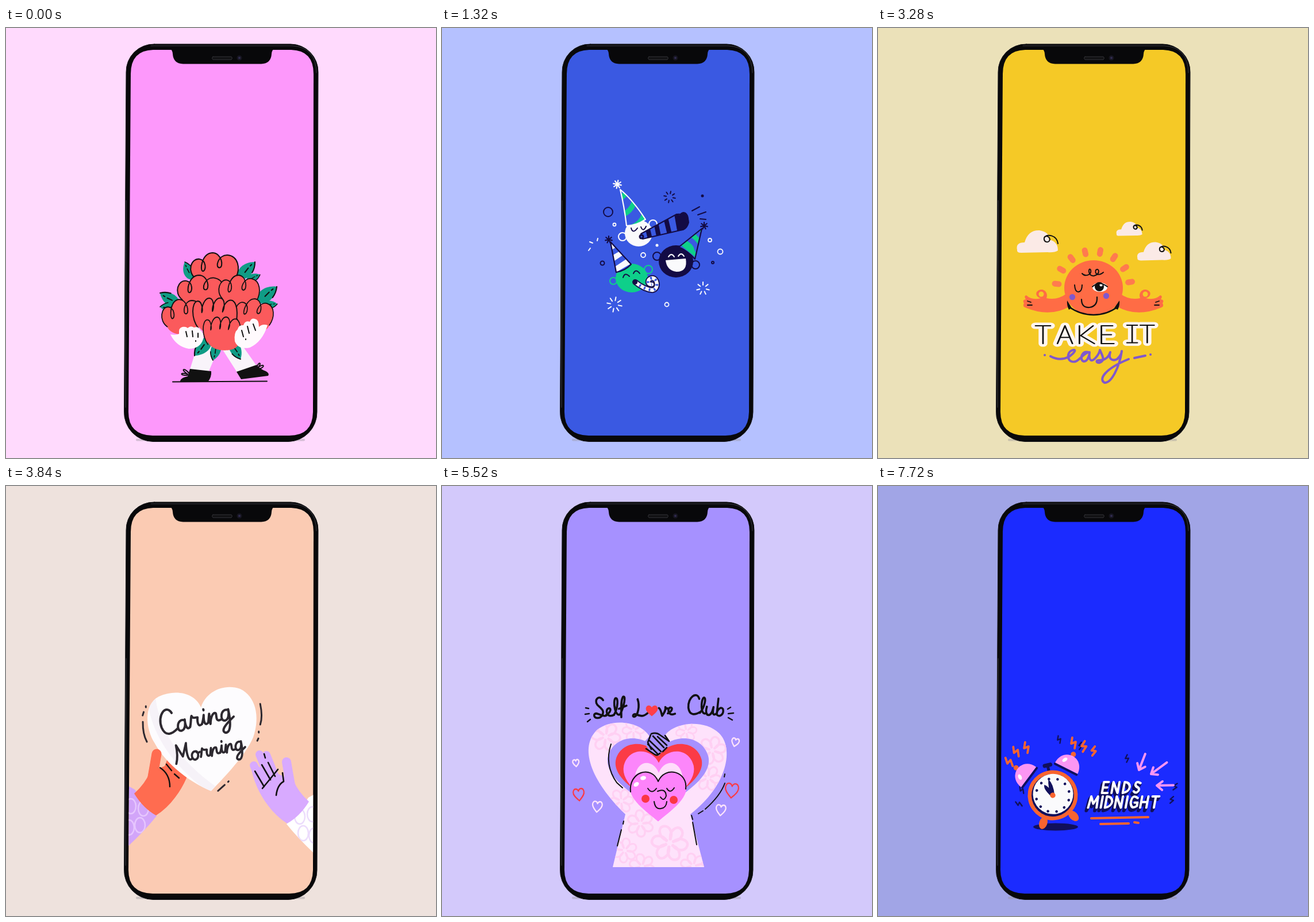
An HTML page with a canvas for the animation above (7.8 s loop, 748x748 px).

```html
<!DOCTYPE html>
<html lang="en">
<head>
<meta charset="utf-8">
<title>Phone stickers</title>
<style>
html, body { margin: 0; width: 100%; height: 100%; overflow: hidden; }
canvas { display: block; width: 100vw; height: 100vh; }
</style>
</head>
<body>
<canvas id="stage" width="748" height="748"></canvas>
<script>
const c = document.getElementById('stage').getContext('2d');
const TAU = Math.PI * 2, BLACK = '#111';
const wave = x => Math.sin(TAU * x);
const clamp = x => Math.max(0, Math.min(1, x));
const mix = (a, b, k) => a + (b - a) * k;

const fill = (d, col) => { c.fillStyle = col; c.fill(new Path2D(d)); };
const line = (d, col = BLACK, w = 2) => { c.strokeStyle = col; c.lineWidth = w; c.stroke(new Path2D(d)); };
const both = (d, col, edge, w) => { fill(d, col); line(d, edge, w); };
function at(x, y, rot, sx, draw, sy = sx) {
  c.save(); c.translate(x, y); c.rotate(rot); c.scale(sx, sy); draw(); c.restore();
}
// turn and shift a drawing around a pivot
function sway(px, py, rot, dx, dy, draw) {
  c.save(); c.translate(px + dx, py + dy); c.rotate(rot); c.translate(-px, -py); draw(); c.restore();
}
function oval(x, y, rx, ry, col, rot = 0) {
  c.fillStyle = col; c.beginPath(); c.ellipse(x, y, rx, ry, rot, 0, TAU); c.fill();
}
const dot = (x, y, r, col) => oval(x, y, r, r, col);
function ring(x, y, r, col, w = 2, ry = r) {
  c.strokeStyle = col; c.lineWidth = w; c.beginPath(); c.ellipse(x, y, r, ry, 0, 0, TAU); c.stroke();
}
function burst(x, y, r1, r2, count, col, w = 2) {
  c.strokeStyle = col; c.lineWidth = w; c.beginPath();
  for (let i = 0; i < count; i++) {
    const a = TAU * (i + .25) / count;
    c.moveTo(x + r1 * Math.cos(a), y + r1 * Math.sin(a));
    c.lineTo(x + r2 * Math.cos(a), y + r2 * Math.sin(a));
  }
  c.stroke();
}

// lettering: [path, advance]
const SCRIPT = {
  C: ['M14 -21C10 -32 -2 -22 0 -8C2 3 10 1 16 -3', 16],
  M: ['M0 0C4 -8 5 -18 5 -25L11 -8L19 -25C17 -14 16 1 22 -2', 22],
  S: ['M12 -22C8 -30 0 -24 4 -17C8 -12 13 -9 9 -3C5 2 -3 0 -1 -5C3 -9 8 0 14 -2', 14],
  L: ['M3 -24C6 -14 2 -2 -2 0C-6 1 -5 -5 0 -3C6 0 10 1 16 -4', 16],
  a: ['M10 -10C2 -15 -2 0 4 0C9 0 10 -8 10 -11C9 -2 11 1 14 -2', 14],
  r: ['M0 -2C2 -6 3 -12 4 -13C5 -9 8 -11 10 -10C8 -4 9 1 13 -2', 13],
  i: ['M0 -2C2 -5 3 -8 4 -11C2 -3 3 1 7 -2M5 -17V-16', 7],
  n: ['M0 -2L3 -11L2 0C4 -8 8 -12 10 -10C11 -8 7 0 14 -2', 14],
  g: ['M10 -10C2 -15 -2 0 4 0C8 0 10 -6 10 -11C10 0 8 14 2 13C-4 10 4 4 14 -2', 14],
  o: ['M8 -11C0 -13 -1 0 5 0C11 -1 11 -10 8 -11C9 -8 11 -8 13 -9', 13],
  e: ['M0 -3C6 -5 8 -11 4 -11C-1 -10 0 2 10 -2', 10],
  l: ['M0 -2C6 -10 8 -24 4 -23C0 -20 1 2 8 -2', 8],
  f: ['M0 -2C6 -12 10 -25 6 -24C2 -20 2 -6 1 2M-1 -9L9 -12', 9],
  v: ['M0 -11C3 -9 3 -3 4 0C7 -4 10 -8 9 -12C10 -10 11 -9 12 -10', 12],
  u: ['M1 -11C-1 -2 2 1 5 0C9 -2 9 -7 10 -11C9 -2 10 1 14 -2', 14],
  b: ['M2 -23L1 -1C6 3 11 -3 9 -9C6 -13 2 -8 1 -4', 13]
};
const BLOCK = {
  T: ['M0 0H12M6 0V20', 12], A: ['M0 20L6 0L12 20M2 13H10', 12], K: ['M0 0V20M11 0L1 11L12 20', 12],
  E: ['M9 0H0V20H10M0 10H8', 9], I: ['M0 0H9M4.5 0V20M0 20H9', 9], i: ['M1 0V20', 2],
  N: ['M0 20V0L11 20V0', 12], D: ['M0 0V20Q11 18 11 9Q9 0 0 0', 11], G: ['M11 3Q0 -5 0 11Q3 24 12 17V11H7', 12],
  S: ['M10 2Q1 -3 1 5Q3 9 7 10Q12 15 6 19Q3 20 0 17', 10], M: ['M0 20L2 0L8 13L14 0L15 20', 15], H: ['M0 0V20M11 0V20M0 10H11', 12]
};
function write(font, word, x, y, size, col, w, { rot = 0, gap = 0, slant = 0, wide = 1 } = {}) {
  at(x, y, rot, size * wide, () => {
    c.transform(1, 0, slant, 1, 0, 0);
    for (const ch of word) {
      line(font[ch][0], col, w / size);
      c.translate(font[ch][1] + gap, 0);
    }
  }, size);
}

const HEART = 'M0 -.3C-.1 -.55 -.42 -.58 -.49 -.25C-.54 .05 -.2 .3 0 .5C.2 .3 .54 .05 .49 -.25C.42 -.58 .1 -.55 0 -.3Z';
const heart = (x, y, w, h, col) => at(x, y, 0, w, () => fill(HEART, col), h);
const heartLine = (x, y, s, col, rot) => at(x, y, rot, s, () => line(HEART, col, 2.2 / s), s * 1.1);

// ---- bouquet ----
const RED = '#fb5a5c';
const BLOOM3 = 'M-30 16C-46 4 -38 -20 -24 -18C-12 -16 -12 2 -18 3C-24 2 -20 -28 -2 -29C14 -29 18 -4 10 -3C2 -3 8 -26 24 -25C42 -23 46 -2 38 14';
const BLOOM4 = 'M-30 22C-44 4 -42 -22 -32 -24C-23 -25 -22 -8 -24 -5C-25 -14 -19 -30 -10 -29C-2 -28 -2 -12 -5 -7C-6 -16 1 -31 10 -29C18 -27 17 -12 13 -6C14 -18 22 -28 31 -25C42 -18 40 8 34 20';
function bloom(x, y, w, h, rot, top = BLOOM3) {
  at(x, y, rot, w / 80, () => {
    fill(top + 'C34 38 -24 38 -30 16Z', RED);
    line(top, BLACK, 2);
  }, h / 58);
}
function leaf(x, y, tx, ty) {
  at(x, y, Math.atan2(ty - y, tx - x), Math.hypot(tx - x, ty - y) / 40, () => {
    fill('M0 0C8 -16 28 -13 40 0C28 12 10 14 0 0Z', '#109c86');
    line('M16 0L25 -1M30 -1H33M24 9Q33 7 40 0');
  });
}
function foot(dy, rot, px, py, d, laces) {
  sway(px, py, rot, 0, dy, () => { fill(d, BLACK); line(laces); });
}
function bouquet(n) {
  const s = wave(n / 12), lift = (1 - Math.cos(TAU * n / 12)) / 2, dx = 11 * s, hop = -3 * Math.abs(s);
  line('M290 615.5L454 614.5');
  fill(`M${333 + dx} 552H${372 + dx}L352 ${599 - 6 * lift}L319 ${597 - 6 * lift}Z`, '#f9f4fa');
  fill(`M${372 + dx} 552L${408 + dx} 548L437 ${589 + 5 * lift}L402 ${599 + 5 * lift}Z`, '#f9f4fa');
  foot(-5 * lift, .13 * lift, 330, 606, 'M320 593L357 597Q358 607 351 616H303Q302 609 316 606Z',
    'M318 600C308 589 304 595 316 602C302 598 302 605 316 604');
  foot(6 * lift, .14 * lift, 430, 604, 'M401 598L436 586Q441 593 452 597Q459 601 456 605L409 611Z',
    'M436 591C440 578 446 583 438 591C449 582 452 590 440 593');
  sway(365, 555, .09 * s, dx * .5, hop, () => {
    leaf(324, 438, 311, 407); leaf(404, 437, 433, 407); leaf(418, 440, 442, 429);
    leaf(437, 478, 471, 450); leaf(445, 483, 472, 480); leaf(303, 482, 268, 461); leaf(302, 486, 268, 485);
    leaf(356, 538, 328, 570); leaf(368, 545, 360, 578); leaf(390, 543, 408, 576);
    bloom(361, 420, 82, 58, 0); bloom(337, 458, 80, 56, .03); bloom(404, 458, 70, 56, .1);
    bloom(305, 501, 70, 58, -.1); bloom(430, 498, 66, 54, .2);
    bloom(364, 500, 78, 60, 0, BLOOM4); bloom(376, 530, 66, 54, 0, BLOOM4);
    fill('M286 533Q296 535 301 532Q300 521 307 520Q313 519 316 522Q321 517 327 521Q335 518 338 526Q345 530 343 541Q338 558 318 558Q296 554 286 533Z', '#fffafd');
    line('M313 528L315 537M324 527L325 537M334 531V538M330 544V545', BLACK, 2);
    fill('M455 517Q446 514 440 520Q440 507 433 506Q427 504 424 511Q416 508 413 517Q405 516 403 524Q396 530 398 545Q404 560 424 556Q446 546 455 517Z', '#fffafd');
    line('M430 515L434 526M420 519L423 531M410 526L413 537M417 541V542');
  });
}

// ---- party ----
const NAVY = '#130b45', MINT = '#0ecf8a', BLUE = '#3a59e2', SNOW = '#fafafc';
function hat(d, base, stripe, edge, bands) {
  fill(d, base);
  c.save(); c.clip(new Path2D(d)); line(bands, stripe, 9); c.restore();
  line(d, edge, 2.2);
}
function party(n) {
  const s = wave(n / 12), s2 = wave(n / 6), pop = 1 + .25 * s2;
  sway(342, 378, .06 * s, 0, 2 * s2, () => {
    burst(305, 272, 1, 7, 8, SNOW, 2.2);
    ring(314, 363, 7, SNOW); ring(367, 341, 7, SNOW);
    oval(342, 357, 24, 23, SNOW);
    hat('M310 281Q332 299 354 333Q338 344 321 344Q317 310 310 281Z', BLUE, MINT, SNOW, 'M307 300L324 284M312 326Q328 320 334 304M320 349Q345 345 352 324');
    line('M329 348Q332 359 340 348M346 346Q350 356 355 345', NAVY);
    at(346, 363, 0, 1 + .08 * s, () => {
      const horn = 'M0 -5L62 -39Q82 -41 83 -25Q80 -12 68 -11L3 4Z';
      fill(horn, BLUE);
      c.save(); c.clip(new Path2D(horn)); line('M11 -17L17 8M26 -25L32 4M43 -33L51 0M61 -45L69 0', NAVY, 8); c.restore();
      line(horn, NAVY, 2); oval(73, -27, 10, 16, NAVY, .15); dot(1, 0, 4.5, NAVY); dot(1, 0, 1.5, BLUE);
    });
  });
  sway(330, 455, -.06 * s, 0, -2 * s2, () => {
    burst(290, 368, 1, 6, 7, NAVY, 2.2);
    ring(298, 440, 6, MINT); ring(359, 420, 7, MINT);
    oval(330, 435, 28, 25, MINT);
    hat('M293 372L329 411Q319 422 303 425Z', SNOW, BLUE, NAVY, 'M290 394L309 383M296 413L320 397M303 430L334 412');
    line('M315 434Q318 424 326 432M333 427Q337 418 344 427', NAVY);
    const curl = 'M336 442C346 450 355 455 366 456C378 454 375 434 365 435C356 437 357 447 365 446';
    line(curl, NAVY, 10); line(curl, SNOW, 6.5);
    c.setLineDash([3, 6]); c.lineCap = 'butt'; line(curl, BLUE, 5); c.setLineDash([]); c.lineCap = 'round';
    dot(336, 442, 4, NAVY);
  });
  sway(407, 430, .06 * s2, 0, 2 * s, () => {
    burst(456, 344, 1, 6, 7, NAVY, 2.2);
    ring(374, 397, 7, NAVY); ring(441, 412, 7, NAVY);
    oval(407, 406, 30, 28, NAVY);
    hat('M452 349L440 402Q428 388 412 381Z', MINT, BLUE, NAVY, 'M424 364Q442 373 444 386M440 351L455 367M411 380L440 404');
    line('M394 398Q399 390 404 398M411 397Q416 389 421 397', SNOW);
    fill('M389 404L424 401Q428 424 408 424Q391 422 389 404Z', SNOW);
  });
  burst(396, 294, 6 * pop, 10 * pop, 8, NAVY);
  burst(300, 481, 7 * pop, 13 * pop, 8, SNOW);
  burst(454, 453, 6 * pop, 11 * pop, 7, SNOW);
  line('M435 318L448 311M445 325L459 320M449 332L459 333', NAVY);
  line('M271 366L270 370M262 374L257 372M258 383L255 387', SNOW);
  [[300, 342, 2.5], [350, 395, 4], [391, 481, 3.5], [466, 369, 3], [484, 389, 4.5]].forEach(([x, y, r], i) =>
    ring(x, y + 2 * s * (i % 2 ? 1 : -1), r, SNOW, 1.8));
  dot(374, 378, 2.5, SNOW);
  ring(289, 320 - 2 * s, 8, NAVY); dot(453, 292, 2.5, NAVY); ring(471, 408, 2, NAVY); ring(279, 409, 3.5, NAVY);
}

// ---- sun ----
const SUN = '#ff6c45', VIOLET = '#8058cc';
function cloud(x, y, s) {
  at(x, y, 0, s, () => {
    fill('M-35 15Q-38 2 -22 2Q-16 -20 4 -19Q22 -16 20 -3Q36 0 36 16Q30 20 18 19L-28 20Q-36 20 -35 15Z', '#fbeae6');
    line('M12 -6C11 2 20 4 22 -3C21 -9 14 -11 12 -6C16 -14 34 -11 36 4', BLACK, 2 / s);
  });
}
function arm(bend) {
  sway(330, 475, bend, 0, 0, () => {
    fill('M328 462Q312 474 293 470C297 460 288 452 280 456C272 460 275 468 283 470Q268 474 258 465Q253 466 257 472Q250 473 254 479Q250 484 258 487Q300 504 334 484Z', SUN);
    dot(284, 463, 4.5, '#f5c926');
    line('M260 475L266 477M260 482L268 482', BLACK, 1.8);
  });
}
function sun(n) {
  const s = wave((n - 8) / 12);
  cloud(277 - 26 * s, 371, 1); cloud(480 + 24 * s, 388, .82); cloud(437 + 14 * s, 349, .63);
  for (let i = 0; i < 8; i++)
    at(375, 453, (187 + i * 23.3) * Math.PI / 180, 1, () => line(`M${61 + 3 * s} 0h7`, '#ff7b4e', 10));
  arm(.08 * s);
  c.save(); c.translate(749, 0); c.scale(-1, 1); arm(.08 * s); c.restore();
  oval(375, 452, 51, 48, SUN);
  fill('M329 474Q328 482 332 490L337 487ZM420 474Q421 482 417 490L411 487Z', BLACK);
  line('M332 485Q352 499 375 499Q398 499 417 485', BLACK, 2.6);
  line('M342 447Q343 460 349 459Q355 458 355 447');
  oval(386, 451, 13, 8, SNOW); dot(385, 450, 8, BLACK); dot(388, 447, 2.5, SNOW);
  line('M373 450Q385 439 399 450');
  dot(338, 468, 5.2, VIOLET); dot(397, 466, 5.2, VIOLET);
  line('M354 472Q354 487 368 486Q382 484 381 468', BLACK, 2.2);
  line('M355 427C360 433 372 430 370 421C366 414 364 433 376 431C388 428 384 416 379 421C376 428 384 432 392 425');
  for (const [col, w] of [['#fff6f0', 11], [BLACK, 2]]) {
    write(BLOCK, 'TAKE', 274, 518, 1.55, col, w, { gap: 5.6, wide: 1.4 });
    write(BLOCK, 'IT', 433, 517, 1.53, col, w, { gap: 2.5, wide: 1.32 });
  }
  line('M300 571Q316 580 332 572C346 562 344 558 337 561C326 566 330 584 344 580C352 576 356 568 366 564C354 560 350 578 358 580C366 580 368 566 368 564C366 580 372 582 380 572Q385 566 386 560C390 570 396 578 386 582C380 583 378 578 384 578C398 578 402 570 404 564C400 576 408 580 416 576Q424 568 424 562C420 590 406 618 394 617C384 612 392 594 436 576M446 574L465 570M474 568h.1M290 569h.1', VIOLET, 4);
}

// ---- passing the heart ----
const THUMB = 'M488 480Q491 498 495 520', INKY = '#2d2930';
function hand(skin, sleeve, pattern) {
  const cuff = 'M488 588Q506 572 526 542L537 536V640Q508 613 488 588Z';
  fill(cuff, sleeve);
  c.save(); c.clip(new Path2D(cuff));
  for (const [x, y] of [[511, 575], [533, 571], [517, 604], [536, 608]]) ring(x, y, 9, pattern, 2.5, 13);
  c.restore();
  fill('M425 484Q432 525 456 556Q470 575 489 587Q511 575 527 549Q508 532 500 512L452 492Z', skin);
  line('M431 486L448 520M441 467L458 508M453 468L470 510', skin, 14);
  line(THUMB, skin, 16);
}
function pass(n) {
  const q = clamp((n - 14) / 7), shake = n < 12 ? wave((n - 10) / 6) : 0;
  const mirror = draw => { c.save(); c.translate(750, -14); c.scale(-1, 1); draw(); c.restore(); };
  mirror(() => hand('#ff6c50', '#d2a5f9', '#e6c6fe'));
  const catchUp = 10 * clamp((n - 17) / 2) * (1 - q);
  c.save(); c.translate(0, -catchUp);
  hand('#d8aaff', '#fff', '#ecdcfc');
  line('M433 496L449 523M445 485L460 511M449 466L451 473M456 481L468 505M446 526L473 493M470 538Q472 520 483 514L481 499', BLACK, 2.6);
  c.restore();
  sway(343, 440, .035 * shake + .1 * wave(q / 2) - .03 * q, 64 * q, 10 * q - 100 * 4 * q * (1 - q), () => {
    const body = 'M341 385C330 358 296 352 268 364C240 378 244 420 258 444C278 484 320 516 354 531C380 506 416 470 430 440C444 404 436 368 410 355C382 344 350 358 341 385Z';
    fill(body, '#fdfcfe');
    c.save(); c.clip(new Path2D(body)); line('M254 355Q258 455 360 531', '#f6f2f8', 15); c.restore();
    write(SCRIPT, 'Caring', 274, 431, 1.62, INKY, 4, { rot: -.2 });
    write(SCRIPT, 'Morning', 295, 482, 1.27, INKY, 3.8, { rot: -.19 });
    if (n < 12) line('M245 380v2M241 390L239 396M239 407Q238 428 245 442M444 382Q448 404 443 418M440 430v2M439 442L437 446M366 531L378 521M384 516L385 515', INKY, 3);
  });
  mirror(() => {
    line(THUMB, '#ff6c50', 17);
    line('M482 504Q465 515 465 537M471 498L462 509M457 515L449 522', BLACK, 2.4);
  });
  if (q === 1) line(THUMB, '#d8aaff', 16);
}

// ---- self love ----
function petals(x, y, r) {
  for (let i = 0; i < 6; i++) at(x, y, i * TAU / 6 + x, r / 20, () => line('M4 -2C9 -9 21 -7 20 0C19 7 9 8 4 2', '#ffd0f3', 3));
}
function club(n) {
  const s = wave(n / 12), s2 = wave(n / 6);
  write(SCRIPT, 'Self', 267, 404, 1.36, BLACK, 3.6, { rot: -.1 });
  write(SCRIPT, 'L', 338, 401, 1.25, BLACK, 3.6, { rot: -.05 });
  heart(365, 391, 21 * (1 + .1 * s2), 19 * (1 + .1 * s2), '#ff3f48');
  write(SCRIPT, 've', 378, 400, 1.25, BLACK, 3.6, { rot: -.05 });
  write(SCRIPT, 'Club', 428, 396, 1.28, BLACK, 3.6, { rot: .06 });
  line('M250 386L255 387M249 397L256 396M253 410L258 406M497 388L502 385M498 396L507 395M498 403L505 407', BLACK, 2.5);
  const torso = 'M360 434C345 411 298 402 270 424C238 454 258 512 319 571L297 663H456L432 571C498 520 508 455 482 430C455 404 402 412 388 434L374 480Z';
  fill(torso, '#fee2fb');
  c.save(); c.clip(new Path2D(torso));
  for (const [x, y, r] of [[285, 436, 25], [333, 425, 19], [345, 587, 23], [396, 621, 31], [318, 634, 21], [470, 460, 24], [463, 508, 22], [312, 548, 21], [425, 427, 18], [348, 662, 22], [437, 661, 22]]) petals(x, y, r);
  c.restore();
  const g = 3 * s2;
  heart(376, 502, 178, 128, '#a691ff');
  heart(377, 503, 152 + g, 110 + g, '#fb3b46');
  heart(377, 512, 124 + g, 102 + g, '#fc86fa');
  heart(377, 526, 84 + g, 90 + g, '#ffdcfb');
  fill('M352 445L364 432Q376 425 388 433L396 445L377 468Q360 466 352 445Z', '#a691ff');
  line('M364 431Q373 428 379 433L395 444M388 434L395 444M363 433L358 446L364 458M367 435L386 455M375 436L391 451M361 443L381 462M358 449L375 466M355 457L370 467Q374 470 379 465M384 462L391 455', BLACK, 2.6);
  sway(376, 575, .06 * s, 3 * s, s2, () => {
    heart(376, 540, 100, 87, '#fd83fa');
    line('M328 532C324 498 364 484 376 514C388 486 428 496 424 527');
    oval(338, 519, 5, 3.5, '#fff', -.6); oval(350, 508, 5, 3.5, '#fff', -.2);
    line('M358 526Q365 537 373 526M391 526Q397 536 404 525M375 531Q389 525 390 539Q386 550 380 541M369 549Q371 563 381 561Q390 560 391 549');
    dot(354, 544, 7, '#fb3644'); dot(403, 546, 7, '#fb3644');
  });
  line('M294 449Q282 485 304 516L314 525M316 583L315 588M312 598L305 626M434 573L436 580M436 585L443 624M492 517Q484 539 458 562M454 565L446 570M491 506L492 501', BLACK, 2);
  [[233, 482, 11, 0, -.1], [238, 537, 19, 1, -.1], [270, 558, 17, 0, .1], [510, 446, 13, 0, .25], [504, 530, 23, 1, .1], [485, 564, 17, 0, .1]].forEach(([x, y, w, red, r], i) =>
    heartLine(x, y, w * (1 + .12 * wave(n / 12) * (i % 2 ? 1 : -1)), red ? '#fb3b46' : '#ffe4fb', r));
}

// ---- alarm clock ----
const ORANGE = '#f9642f', INK = '#11105c', PINK = '#fb96f3';
const bolt = (x, y, s, rot, col, w) => at(x, y, rot, s, () => line('M-4 -12L-5 2L5 -3L4 12', col, w / s));
function arrow(x, y, rot, len) {
  at(x, y, rot, 1, () => line(`M${len} 0H0M10 -7L0 0L9 8`, PINK, 4));
}
function bell(side) {
  at(side * 35, -42, side * .7, 1, () => {
    dot(0, -25, 4.5, ORANGE);
    line('M-21 4H21', INK, 4);
    fill('M-22 2C-21 -30 21 -30 22 2Z', PINK);
    oval(-9, -10, 3, 5, '#fff', .5);
  });
}
function alarm(n) {
  const p = n / 11, k = (1 - Math.cos(5 * Math.PI * p)) / 2, a = (1 - Math.cos(3 * Math.PI * p)) / 2;
  for (const [x, y, r] of [[315, 441, .1], [352, 452, .6], [433, 474, .4], [250, 529, -.2], [245, 553, -.7], [517, 523, .9], [511, 546, .8]])
    bolt(x, y, mix(.8, .52, a), r, INK, 2.4);
  oval(309, 593, 39, 6.5, INK);
  at(mix(317, 304, k), mix(540, 538, k), mix(.23, -.23, k), 1, () => {
    line('M3 -42V-52', INK, 5); line('M-2 -53H8', INK, 7);
    bell(-1); bell(1);
    for (const x of [-1, 1]) oval(x * 27, 43, 7, 11, ORANGE, x * -.55);
    dot(0, 0, 43.5, ORANGE); dot(0, 0, 37, INK); dot(1, -2, 35, SNOW);
    for (let i = 0; i < 12; i++) dot(29 * Math.cos(i * TAU / 12), 29 * Math.sin(i * TAU / 12), 2.3, INK);
    fill('M-4 0Q-14 -15 -10 -21Q-3 -17 2 0ZM-3 0Q-5 -17 -1 -29Q6 -18 3 0Z', INK);
    dot(0, 0, 4.7, ORANGE);
  });
  for (const [x, y, u, v, r, q] of [[257, 462, 228, 480, -.25, -.4], [272, 450, 240, 462, 0, -.2], [291, 448, 258, 455, .2, .1], [381, 468, 340, 447, .75, .1], [398, 479, 358, 453, .9, .5], [405, 492, 375, 461, 1.1, .6]])
    bolt(mix(x, u, k), mix(y, v, k), y > 490 ? .65 : mix(1.05, .75, k), mix(r, q, k), ORANGE, 3.8);
  for (const [dx, dy, col, w] of [[-3, 5, INK, 6], [-1.5, 2.5, INK, 6], [0, 0, '#fff', 4]]) {
    write(BLOCK, 'ENDS', 393 + dx, 515 + dy, .95, col, w, { gap: 8.5, slant: -.18 });
    write(BLOCK, 'MiDNiGHT', 369 + dx, 540 + dy, .98, col, w, { gap: 6.4, slant: -.18 });
  }
  arrow(450 + 4 * a, 505 - 11 * a, -1.2, 30);
  arrow(464 + 11 * a, 510 - 9 * a, -.63, 34);
  arrow(475 + 10 * a, 521, -.02, 29);
  const grow = 1 - (1 - p) ** 2;
  line(`M371 578L${mix(388, 470, grow)} 576M387 588L${mix(399, 436, grow)} 587`, ORANGE, 4);
  if (grow > .9) line('M446 585L453 586', ORANGE, 4);
}

// ---- phone and timeline ----
const SCREEN = 'M256 38H496Q535 39 535 80L534 668Q533 709 493 709H255Q213 708 213 668L217 80Q217 39 256 38Z';
const BODY = 'M258 28H495A48 48 0 0 1 543 77L541 668A51 51 0 0 1 491 719.5H256A51 51 0 0 1 205.5 667L209 77A48 48 0 0 1 258 28Z';
// draw, start, frame time, page colour, screen colour
const SCENES = [
  [bouquet, 0, 110, '#ffdafd', '#fd98fb'], [party, 1320, 110, '#b5c1ff', BLUE],
  [sun, 2640, 80, '#ebe1b9', '#f5c926'], [pass, 3600, 80, '#eee2dd', '#fbcbb3'],
  [club, 5520, 110, '#d3c9fb', '#a691ff'], [alarm, 6840, 80, '#a1a5e6', '#1b2bff']
];
function render(ms) {
  const t = ms % 7800;
  const [draw, start, step, page, screen] = SCENES.filter(s => s[1] <= t).pop();
  c.lineCap = c.lineJoin = 'round';
  c.fillStyle = page; c.fillRect(0, 0, 748, 748);
  line('M228 716.5H518', 'rgba(150,146,152,.4)', 4);
  both(BODY, '#08080a', '#18181b', 1);
  line('M252 31H498Q539 33 540 78M209 300L208 660', '#3b3b42', 1);
  c.save();
  c.clip(new Path2D(SCREEN));
  c.fillStyle = screen; c.fillRect(200, 30, 350, 690);
  draw(Math.floor((t - start) / step));
  c.restore();
  fill('M284 34Q290 39 290 45Q291 62 308 62.5H444Q461 62 462 45Q462 39 468 34Z', '#08080a');
  both('M360 50H392Q395 52 392 55H360Q357 52 360 50Z', '#111113', '#35353a', 1);
  dot(406, 52, 4.5, '#16151f'); dot(406, 52, 2, '#302b50');
}
const begin = performance.now();
function tick() {
  render(performance.now() - begin);
  requestAnimationFrame(tick);
}
tick();
</script>
</body>
</html>
```
